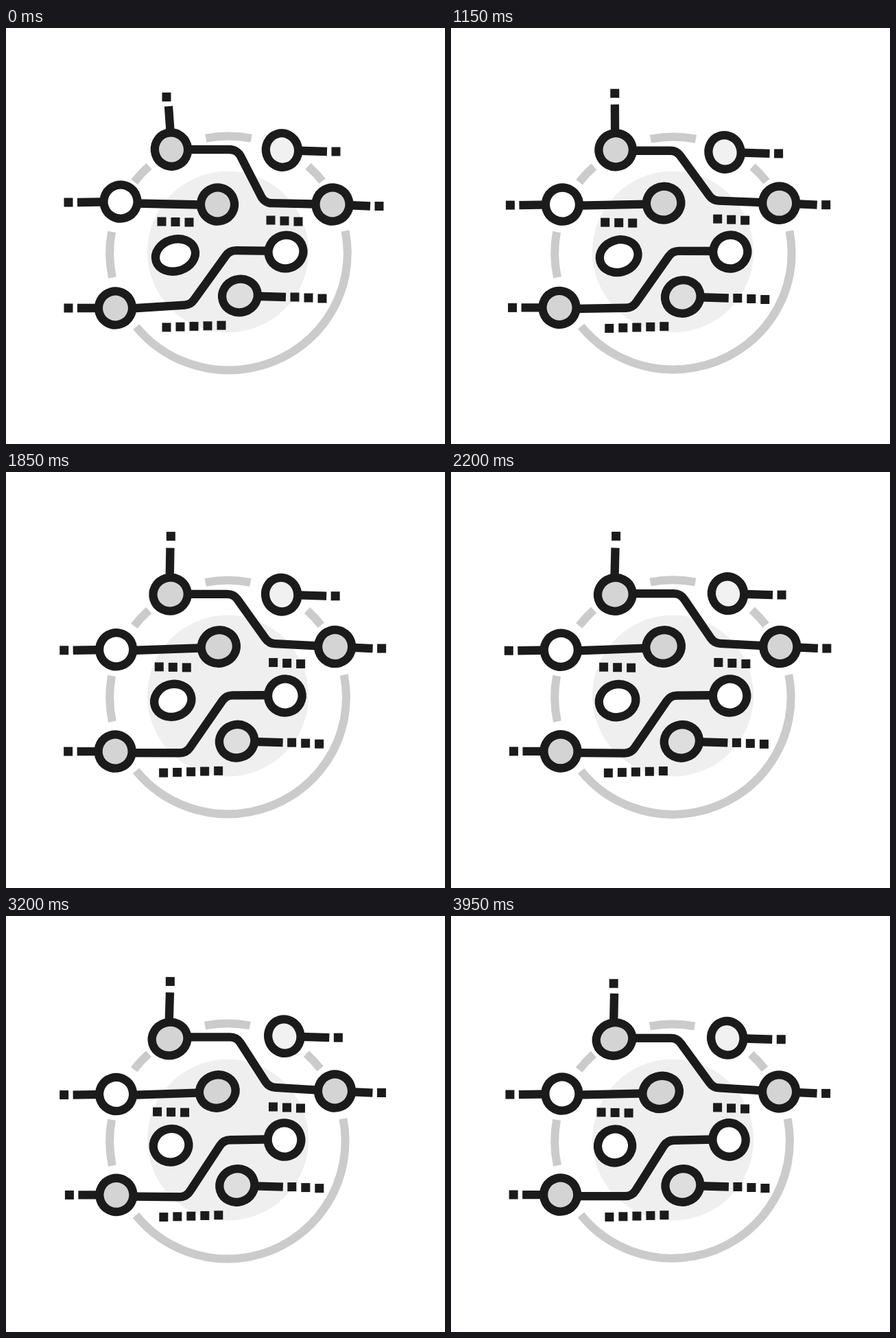
An HTML page with a canvas for the animation above (4000 ms loop, 640 by 606 pixels).

```html
<!DOCTYPE html>
<html lang="en">
<head>
<meta charset="utf-8">
<title>Circuit</title>
<style>
  html, body { margin: 0; width: 100%; height: 100%; overflow: hidden; background: #fff; }
  canvas { display: block; width: 100vw; height: 100vh; }
</style>
</head>
<body>
<canvas id="stage" width="640" height="606"></canvas>
<script>
const ctx = document.getElementById('stage').getContext('2d');
const LOOP = 4000, STEP = 50;
const INK = '#1b1b1b', RING = '#cbcbcb', DISC = '#efefef';
const MID = '#d4d4d4', SOFT = '#dedede', PALE = '#f1f1f1', WHITE = '#fff';
const NODE_RADIUS = 30.7, NODE_LINE = 12.3, TRACE_LINE = 12.3, SQUARE = 13, GAP = 13;

// A point leaves home by a steady drift, a bell that peaks mid-loop, and a full wave.
const point = (x, y, move = {}, look = {}) => ({ x, y, ...move, ...look });

const nodes = {
  a: point(241, 177, { drift: [-3, 2.5] }, { fill: MID, stretch: [-.5, 2] }),
  b: point(402.5, 178, { wave: [-3.5, 3] }, { fill: PALE, stretch: [-1, -1] }),
  c: point(167, 253, { drift: [-5, 6], bell: [-4, 3] }, { fill: WHITE, stretch: [0, 0] }),
  d: point(308.5, 257, { drift: [-2.5, 0], bell: [3, -2.5] }, { fill: MID, stretch: [0, 2.5] }),
  e: point(476, 257, { drift: [2.5, -1], bell: [2.5, -2] }, { fill: MID, stretch: [0, 0] }),
  f: point(247, 331, { drift: [-8, 4] }, { fill: WHITE, stretch: [5, .5] }),
  g: point(408, 326, { drift: [-2.5, 0] }, { fill: WHITE, stretch: [1, -.5] }),
  h: point(341, 390, { drift: [-3, 2.5], bell: [-3, 1] }, { fill: SOFT, stretch: [1.5, 1] }),
  i: point(159.5, 408, { drift: [0, -2], wave: [-1.5, 0] }, { fill: MID, stretch: [0, 0] })
};

const bends = {
  top1: point(337, 177, { drift: [-8, 1], wave: [-6, 1.5] }),
  top2: point(377, 255, { drift: [5, -5], bell: [4, -3] }),
  low1: point(269, 403, { drift: [-5, 5], bell: [-4, 4] }),
  low2: point(326, 324, { drift: [-11, 3] })
};
const upEnd = point(237, 114, { drift: [1, -1], bell: [2, -3] });
const upSquare = point(234, 100.5, { drift: [3, -2], bell: [5, -6] });

// Squares ride along with a node: [node, x, y, count, rise per square]
const rows = [
  ['b', 481, 180, 1, 0],
  ['c', 91, 254, 1, 0],
  ['e', 544, 259.5, 1, 0],
  ['i', 91, 408, 1, 0],
  ['h', 421, 392, 3, 1],
  ['f', 227, 282, 3, .5],
  ['e', 386, 280, 3, 1],
  ['h', 234, 436, 5, -.7]
];
const STUBS = 5; // the leading rows are wired to their node
const arcs = [[-11, 141], [168, 190.5], [217.5, 228], [259, 281], [312, 322]];

const mix = (a, b, u) => a + (b - a) * u;
const rad = deg => deg * Math.PI / 180;

function offset({ drift = [0, 0], bell = [0, 0], wave = [0, 0] }, u) {
  const [x, y] = [0, 1].map(k =>
    drift[k] * u + bell[k] * Math.sin(Math.PI * u) + wave[k] * Math.sin(2 * Math.PI * u));
  return { x, y };
}

function shift(p, x, y) {
  return { x: p.x + x, y: p.y + y };
}

function place(p, u) {
  const o = offset(p, u);
  return shift(p, o.x, o.y);
}

function trace(points, radius = 18) {
  const last = points[points.length - 1];
  ctx.beginPath();
  ctx.moveTo(points[0].x, points[0].y);
  for (let k = 1; k < points.length - 1; k++) {
    ctx.arcTo(points[k].x, points[k].y, points[k + 1].x, points[k + 1].y, radius);
  }
  ctx.lineTo(last.x, last.y);
  ctx.stroke();
}

function oval(x, y, rx, ry, tilt = 0, from = 0, to = 360) {
  ctx.beginPath();
  ctx.ellipse(x, y, rx, ry, tilt, rad(from), rad(to));
}

function square(p) {
  ctx.fillRect(p.x - SQUARE / 2, p.y - SQUARE / 2, SQUARE, SQUARE);
}

function drawBack(u) {
  ctx.fillStyle = WHITE;
  ctx.fillRect(0, 0, 640, 606);
  ctx.fillStyle = DISC;
  oval(323.5, 326, 117.5, 117.5);
  ctx.fill();

  ctx.strokeStyle = RING;
  ctx.lineWidth = 12;
  const flutter = Math.sin(2 * Math.PI * u);
  for (const [from, to] of arcs) {
    oval(324.5 - 2 * u, 328, 173.3 - 2 * u, 170.5 - flutter, 0, from, to);
    ctx.stroke();
  }
}

function drawNode(node, at, u) {
  const s = mix(...node.stretch, u), r = NODE_RADIUS - NODE_LINE / 2;
  oval(at.x, at.y, r + s, r - s * .3, -.3);
  ctx.fillStyle = node.fill;
  ctx.fill();
  ctx.lineWidth = NODE_LINE;
  ctx.stroke();
}

function drawRow([key, x, y, count, rise], wired, at, u) {
  const o = offset(nodes[key], u);
  const first = shift({ x, y }, o.x, o.y);
  if (wired) trace([at[key], shift(first, x < nodes[key].x ? GAP : -GAP, 0)]);
  for (let k = 0; k < count; k++) square(shift(first, k * 20, k * rise));
}

function draw(u) {
  const at = {};
  for (const [key, p] of Object.entries({ ...nodes, ...bends })) at[key] = place(p, u);

  drawBack(u);
  ctx.strokeStyle = ctx.fillStyle = INK;
  ctx.lineWidth = TRACE_LINE;
  trace([{ x: at.a.x, y: at.top1.y }, at.top1, at.top2, at.e]);
  trace([shift(at.i, 0, 2), at.low1, at.low2, shift(at.g, 0, -1)]);
  trace([shift(at.c, 0, 2), shift(at.d, 0, 1)]);
  trace([place(upEnd, u), shift(at.a, -1, -20)]);
  square(place(upSquare, u));
  rows.forEach((row, k) => drawRow(row, k < STUBS, at, u));
  for (const key in nodes) drawNode(nodes[key], at[key], u);
}

const start = performance.now();
function frame() {
  const t = (performance.now() - start) % LOOP;
  draw(Math.floor(t / STEP) * STEP / LOOP);
  requestAnimationFrame(frame);
}
frame();
</script>
</body>
</html>
```
